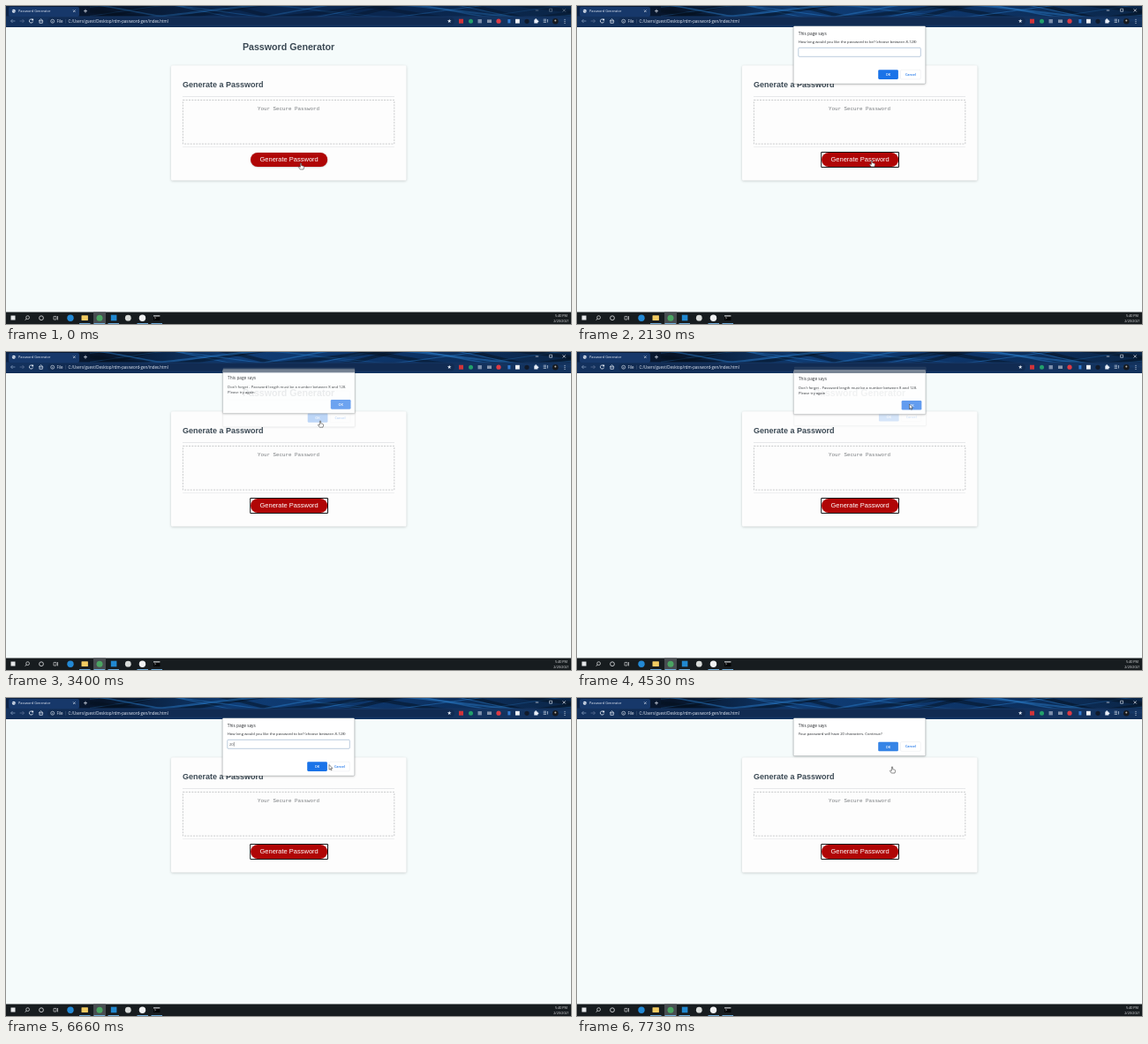
Animation of 640 by 360 pixels, one loop 8000 ms. Source, as an HTML page with a canvas:

```html
<!DOCTYPE html>
<html lang="en">
<head>
<meta charset="utf-8">
<title>Password Generator</title>
<style>
  html, body { margin: 0; width: 100%; height: 100%; overflow: hidden; background: #f5fbfb; }
  canvas { display: block; width: 640px; height: 360px; }
</style>
</head>
<body>
<canvas id="stage" width="640" height="360"></canvas>
<script>
const stage = document.getElementById('stage').getContext('2d');
const layer = document.createElement('canvas').getContext('2d');
layer.canvas.width = 640;
layer.canvas.height = 100;
let ctx = stage;

const LOOP = 8000;
const CLICK = { generate: 1040, prompt: 3290, alert: 4500, accept: 7200 };
const KEYS = [[5400, '2'], [6200, '20']];
const UI = '"Open Sans", "Noto Sans", sans-serif';
const PAGE = '"Liberation Sans", Arial, sans-serif';
const INK = '#3b4954';

const clamp = v => Math.max(0, Math.min(1, v));
const ramp = (t, start, length) => clamp((t - start) / length);
const smooth = p => p * p * (3 - 2 * p);

function box(x, y, w, h, fill, r = 0) {
  ctx.fillStyle = fill;
  ctx.beginPath();
  ctx.roundRect(x, y, w, h, r);
  ctx.fill();
}

function frame(x, y, w, h, color, width = 0.6, r = 0) {
  ctx.strokeStyle = color;
  ctx.lineWidth = width;
  ctx.beginPath();
  ctx.roundRect(x, y, w, h, r);
  ctx.stroke();
}

function disc(x, y, r, fill) {
  ctx.fillStyle = fill;
  ctx.beginPath();
  ctx.arc(x, y, r, 0, 7);
  ctx.fill();
}

function ring(x, y, r, color, width = 0.8, from = 0, to = 7) {
  ctx.strokeStyle = color;
  ctx.lineWidth = width;
  ctx.beginPath();
  ctx.arc(x, y, r, from, to);
  ctx.stroke();
}

function line(points, color, width = 0.8) {
  ctx.strokeStyle = color;
  ctx.lineWidth = width;
  ctx.beginPath();
  points.forEach(([x, y]) => ctx.lineTo(x, y));
  ctx.stroke();
}

function text(str, x, y, size, color, { font = UI, weight = 400, align = 'left' } = {}) {
  ctx.font = `${weight} ${size}px ${font}`;
  ctx.fillStyle = color;
  ctx.textAlign = align;
  ctx.textBaseline = 'alphabetic';
  ctx.fillText(str, x, y);
}

function shadowed(color, blur, dy, draw) {
  ctx.save();
  ctx.shadowColor = color;
  ctx.shadowBlur = blur;
  ctx.shadowOffsetY = dy;
  draw();
  ctx.restore();
}

// Broad blue strands that cross the tab strip
function drawTheme(active) {
  const base = ctx.createLinearGradient(0, 0, 640, 0);
  base.addColorStop(0, '#0c2347');
  base.addColorStop(0.17, '#071428');
  base.addColorStop(0.4, active ? '#0f3c74' : '#0a2750');
  base.addColorStop(0.7, active ? '#0d3467' : '#0a2750');
  base.addColorStop(1, '#0b2648');
  ctx.save();
  ctx.beginPath();
  ctx.rect(0, 0, 640, 24);
  ctx.clip();
  box(0, 0, 640, 24, base);
  ctx.globalAlpha = active ? 0.5 : 0.35;
  for (let i = 0; i < 9; i++) {
    const light = i % 3;
    ctx.strokeStyle = light ? '#2878c4' : '#04101f';
    ctx.lineWidth = light ? 0.6 + i % 4 * 0.5 : 4;
    ctx.beginPath();
    for (let x = 95; x <= 640; x += 5) {
      ctx.lineTo(x, 6 + 11 * Math.sin(x / (44 + i * 7) + i * 1.9));
    }
    ctx.stroke();
  }
  ctx.globalAlpha = 1;
  box(0, 11.5, 640, 12.2, 'rgba(21,52,96,0.9)');
  ctx.restore();
}

function drawBrowser(active) {
  const white = '#e8eef8';
  drawTheme(active);
  box(3, 1, 80, 11, '#17386a', 2);
  disc(8.8, 5.8, 2, white);
  line([[7, 5.2], [10.6, 6.2]], '#17386a', 0.5);
  text('Password Generator', 14, 7.2, 3.82, white);
  line([[76, 4.4], [78.6, 7]], white, 0.6);
  line([[78.6, 4.4], [76, 7]], white, 0.6);
  line([[88, 5.7], [92, 5.7]], white, 0.7);
  line([[90, 3.7], [90, 7.7]], white, 0.7);

  ctx.globalAlpha = active ? 1 : 0.45;
  line([[599.8, 5], [603.2, 5]], white, 0.7);
  frame(615.6, 3.2, 3, 3, white);
  line([[630.6, 3.3], [633.8, 6.5]], white, 0.7);
  line([[633.8, 3.3], [630.6, 6.5]], white, 0.7);
  ctx.globalAlpha = 1;

  for (const [x, dir, color] of [[8, -1, '#8fa4c4'], [18, 1, '#65789c']]) {
    line([[x - 2.4, 17], [x + 2.4, 17]], color, 0.7);
    line([[x + dir * 0.5, 15], [x + dir * 2.5, 17], [x + dir * 0.5, 19]], color, 0.7);
  }
  ring(28.5, 17, 2.1, white, 0.8, 0.3, 5.6);
  box(29.3, 14.6, 1.8, 1.8, white);
  line([[37, 17], [39.6, 14.7], [42.2, 17]], white, 0.7);
  frame(37.9, 16.8, 3.4, 2.5, white, 0.7);

  box(47, 13, 461, 8.5, '#112b52', 4.2);
  ring(52.7, 17.2, 2, white, 0.6);
  line([[52.7, 16.8], [52.7, 18.3]], white, 0.6);
  text('File', 57.4, 18.9, 4.45, white);
  line([[67.6, 14.8], [67.6, 19.6]], '#5a6a86', 0.4);
  text('C:/Users/guest/Desktop/rdm-password-gen/index.html', 70.4, 18.9, 4.45, white);
  text('★', 502.3, 19.3, 6, white, { font: '"DejaVu Sans", sans-serif', align: 'center' });

  box(513, 14.7, 5, 5, '#d0343a');
  disc(526.5, 17.3, 2.5, '#22a06b');
  box(534.5, 15, 4.4, 4.4, '#7d8fac');
  box(545, 15.4, 5, 3.6, '#8593aa');
  disc(558, 17.2, 2.6, '#dd3b45');
  box(568.4, 15, 3, 4.4, '#3179cf');
  box(577, 14.8, 4.8, 4.8, '#f0f2f5');
  disc(590, 17.3, 2.6, '#101a2b');
  box(598.3, 15.5, 4, 4, white);
  disc(600.2, 15.3, 1, white);
  disc(602.5, 17.4, 0.9, white);
  [15.2, 16.8, 18.4].forEach(y => line([[608.7, y], [612, y]], white, 0.6));
  line([[613.5, 15], [613.5, 18.6]], white, 0.6);
  disc(622.3, 17.2, 3.3, '#15191f');
  disc(622.3, 16.4, 1, '#b9b2a8');
  [15.2, 17.2, 19.2].forEach(y => disc(633, y, 0.55, white));
}

function drawPage(focused) {
  box(0, 23.5, 640, 323.5, '#f5fbfb');
  text('Password Generator', 320, 50.3, 10.67, INK, { font: PAGE, weight: 700, align: 'center' });
  shadowed('rgba(0,0,0,0.2)', 3, 0.7, () => box(187, 67.3, 266.5, 130.2, '#fdfdfd', 1.6));
  text('Generate a Password', 200, 92.2, 9, INK, { font: PAGE, weight: 700 });
  box(200, 102.1, 240, 0.7, '#dfe2e4');
  box(200, 159.4, 240, 0.7, '#dfe2e4');
  ctx.setLineDash([2, 1.3]);
  frame(200.4, 106.5, 239.4, 49.6, '#b8bbbd', 0.75);
  ctx.setLineDash([]);
  text('Your Secure Password', 320, 118.1, 5.85, '#777b7e',
    { font: '"Liberation Mono", monospace', align: 'center' });

  const button = () => box(277, 165.9, 87.2, 16.2, '#b00606', 8.1);
  if (focused) {
    box(276.2, 165, 88.8, 18, '#15181a', 1.2);
    box(277.2, 165.9, 86.8, 16.2, '#ffffff', 0.5);
    button();
  } else {
    shadowed('rgba(0,0,0,0.25)', 1.5, 0.4, button);
  }
  text('Generate Password', 320.6, 176.4, 7.5, '#ffffff', { font: PAGE, align: 'center' });
}

function drawTaskbar() {
  const white = '#e6e8ea';
  box(0, 346.5, 640, 13.5, '#171c1f');
  box(5.5, 350.5, 5, 5, white);
  ring(24.6, 352.6, 1.9, white, 0.7);
  line([[23.2, 354], [21.8, 355.6]], white, 0.8);
  ring(40, 353.2, 2.4, white, 0.8);
  frame(54, 351.4, 3, 3.6, white, 0.6);
  line([[58.5, 351], [58.5, 355.4]], white, 0.7);
  box(99, 346.5, 14, 13.5, '#484d51');
  disc(73, 353.2, 3.7, '#2389d5');
  box(85.5, 350.2, 7.4, 5.8, '#f2cb62', 0.5);
  disc(106, 353.2, 3.5, '#4ba462');
  box(118.8, 349.7, 6.6, 6.6, '#2188d0');
  disc(138.3, 353.2, 3.4, '#d9dcda');
  disc(154.5, 353.2, 3.7, '#f0f1f2');
  box(167, 350.2, 7.4, 5.8, '#050607');
  box(167, 350.2, 7.4, 1.3, '#c5c9cc');
  line([[168.3, 352.4], [169.6, 353.2], [168.3, 354]], white, 0.5);
  [83, 99.5, 115.5, 148.5, 164.5].forEach(x => box(x, 359.1, 12.5, 0.9, '#76b9ed'));
  text('5:40 PM', 629, 352.2, 3.7, white, { align: 'center' });
  text('2/20/2021', 629, 358, 3.7, white, { align: 'center' });
}

function primary(x, y, color = '#1a73e8') {
  box(x, y, 22.7, 10.6, color, 1.3);
  text('OK', x + 11.3, y + 6.8, 3.8, '#ffffff', { weight: 600, align: 'center' });
}

function cancel(y) {
  box(366.5, y, 22.8, 10.6, '#ffffff', 1.3);
  frame(366.5, y, 22.8, 10.6, '#e0e3e7', 0.4, 1.3);
  text('Cancel', 378, y + 6.7, 3.8, '#1a73e8', { weight: 600, align: 'center' });
}

function panel(height, ...lines) {
  shadowed('rgba(0,0,0,0.35)', 2.5, 0.5, () => box(245.3, 22.7, 149.4, height, '#ffffff', 0.8));
  frame(245.3, 22.7, 149.4, height, 'rgba(80,90,95,0.4)', 0.4, 0.8);
  text('This page says', 250.8, 33.2, 4.77, '#25282c');
  lines.forEach((str, i) => text(str, 250.8, 42.4 + i * 6.6, 4.15, '#25282c'));
}

function promptDialog(value, caret) {
  panel(65.2, 'How long would you like the password to be? (choose between 8-128)');
  frame(250.8, 47.3, 138.5, 10, '#8eaac6', 0.6, 1);
  text(value, 253, 53.8, 4.15, '#4a4d52');
  if (caret) {
    ctx.font = `400 4.15px ${UI}`;
    box(253.2 + ctx.measureText(value).width, 49.8, 0.4, 5, '#202124');
  }
  primary(341.2, 72.3);
  cancel(72.3);
}

function alertDialog() {
  panel(48.6, "Don't forget - Password length must be a number between 8 and 128.", 'Please try again');
  primary(367.5, 55.9, '#5594ee');
}

function confirmDialog() {
  panel(42.8, 'Your password will have 20 characters. Continue?');
  primary(341.2, 49.7, '#3584e6');
  cancel(49.7);
}

// Fades a dialog in while it drops into place, and out while it rises.
// Its grey caption strip shows only while it moves.
function present(t, open, close, draw) {
  if (t < open || t > close + 170) return;
  const p = ramp(t, open, 180), q = ramp(t, close, 170);
  const away = Math.max(1 - p, q);
  if (away === 0) return draw();

  ctx = layer;
  ctx.clearRect(0, 0, 640, 100);
  ctx.save();
  ctx.translate(away * 0.8, away * -4.8);
  draw();
  box(245.3, 21, 149.4, 4, '#7f8a98', 0.8);
  ctx.restore();
  ctx = stage;

  ctx.globalAlpha = (1 - (1 - p) ** 2) * (1 - smooth(q));
  ctx.drawImage(layer.canvas, 0, 0);
  ctx.globalAlpha = 1;
}

// Pointer stops: time, x, y of the tip
const PATH = [
  [0, 334, 178], [400, 335, 176.5], [800, 334, 175], [2400, 334, 175], [3200, 356, 78.2],
  [3950, 356, 78.2], [4450, 376.5, 59], [4600, 376.5, 59], [5600, 375, 64], [6380, 375, 64],
  [6660, 366, 75.5], [7060, 354, 77], [7500, 354, 77], [7730, 357, 78], [LOOP, 357, 78]
];

function pointerAt(t) {
  const i = Math.max(1, PATH.findIndex(stop => stop[0] > t));
  const [t0, x0, y0] = PATH[i - 1], [t1, x1, y1] = PATH[i];
  const p = smooth(ramp(t, t0, t1 - t0));
  return [x0 + (x1 - x0) * p, y0 + (y1 - y0) * p];
}

function drawPointer(t) {
  const hand = t < 4000 || t > 7500;
  const shape = new Path2D(hand
    ? 'M-.6 0Q0-.7.6 0V2.6L3 3.3Q3.8 3.6 3.6 4.6L3 7H-.8L-2.6 4.5Q-2.7 3.4-.6 4.4Z'
    : 'M0 0V5.6L1.3 4.5 2.2 6.4 3.1 6 2.2 4.1H4Z');
  ctx.save();
  ctx.translate(...pointerAt(t));
  ctx.fillStyle = '#ffffff';
  ctx.strokeStyle = '#333333';
  ctx.lineWidth = 0.55;
  ctx.fill(shape);
  ctx.stroke(shape);
  ctx.restore();
}

function render(t) {
  const active = t >= CLICK.generate;
  const typed = KEYS.filter(([time]) => t >= time).pop() || [4600, ''];
  const blink = since => Math.floor((t - since) / 530) % 2 === 0;
  drawPage(active);
  drawBrowser(active);
  drawTaskbar();
  present(t, CLICK.generate, CLICK.prompt, () => promptDialog('', !blink(1070)));
  present(t, CLICK.alert + 15, CLICK.accept, () => promptDialog(typed[1], blink(typed[0])));
  present(t, CLICK.accept + 20, Infinity, confirmDialog);
  present(t, CLICK.prompt, CLICK.alert, alertDialog);
  drawPointer(t);
}

function tick() {
  render(performance.now() % LOOP);
  requestAnimationFrame(tick);
}
tick();
</script>
</body>
</html>
```
